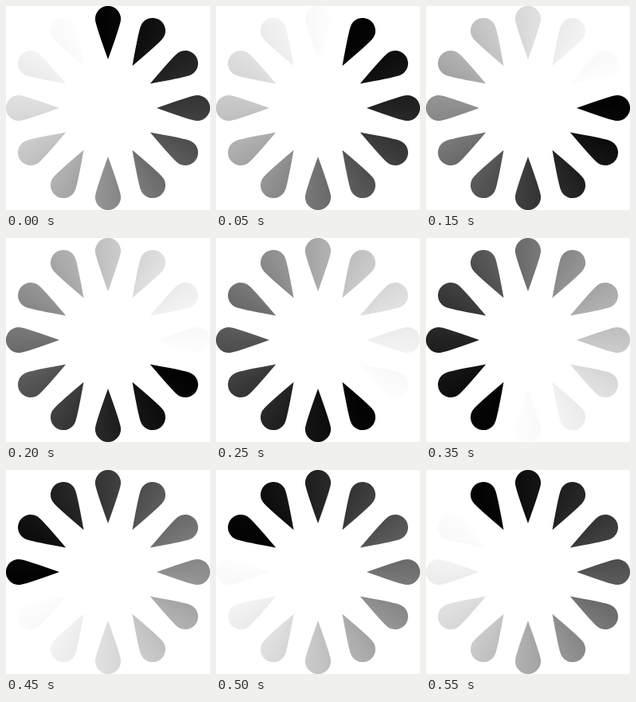
Write an HTML page with a canvas that moves like this. It is 256 px wide and 256 px high and loops after 600 ms.

```html
<!DOCTYPE html>
<html lang="en">
<head>
<meta charset="utf-8">
<title>Spinner</title>
<style>
  html, body { margin: 0; width: 100%; height: 100%; overflow: hidden; background: #fff; }
  canvas { display: block; width: 256px; height: 256px; }
</style>
</head>
<body>
<canvas id="stage" width="256" height="256"></canvas>
<script>
const ctx = document.getElementById('stage').getContext('2d');
const PETALS = 12, STEP_MS = 50, CENTER = 128;
const TURN = 2 * Math.PI;

// All petals form one fixed shape; only the shading turns.
const petal = new Path2D('M0 -61 Q-13 -97 -15.6 -108 A16.1 16.1 0 1 1 15.6 -108 Q13 -97 0 -61 Z');
const ring = new Path2D();
for (let i = 0; i < PETALS; i++) {
  ring.addPath(petal, new DOMMatrix().translate(CENTER, CENTER).rotate(i * 360 / PETALS));
}

// Black to white around the circle, softened at both ends.
function shade(x) {
  const smooth = x * x * (3 - 2 * x);
  return Math.round(255 * (0.75 * smooth + 0.25 * x));
}

function sweep(step) {
  const start = (step - 0.5) / PETALS * TURN - Math.PI / 2;
  const gradient = ctx.createConicGradient(start, CENTER, CENTER);
  for (let i = 0; i <= 24; i++) {
    const v = shade(i / 24);
    gradient.addColorStop(i / 24, `rgb(${v},${v},${v})`);
  }
  return gradient;
}

let shown = -1;
function draw() {
  const step = Math.floor(performance.now() / STEP_MS) % PETALS;
  if (step !== shown) {
    shown = step;
    ctx.clearRect(0, 0, 256, 256);
    ctx.fillStyle = sweep(step);
    ctx.fill(ring);
  }
  requestAnimationFrame(draw);
}
draw();
</script>
</body>
</html>
```
